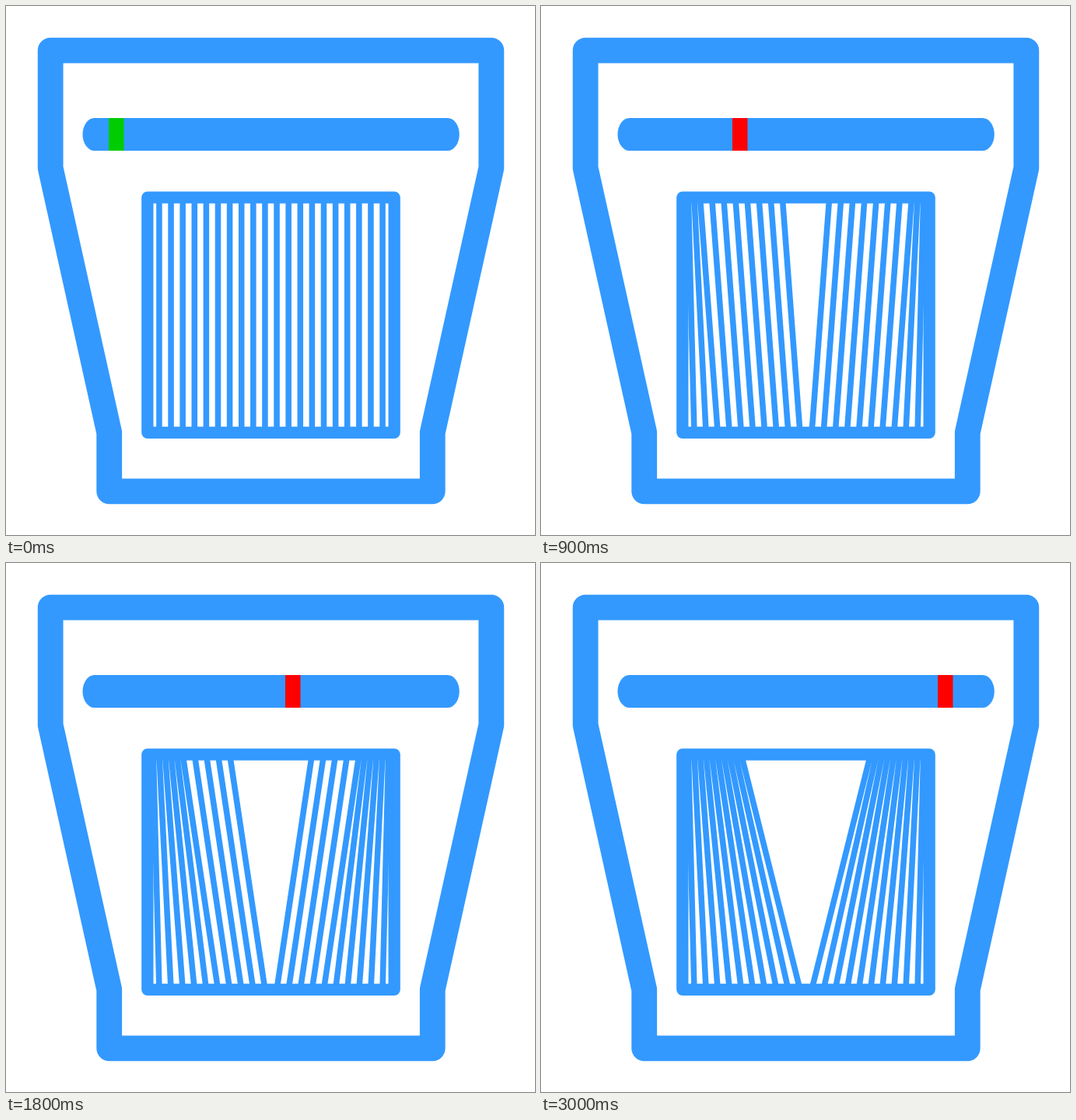
Recreate the animation shown at these times as an HTML page. Size 680 px wide and 680 px high, loop 3.3 s.

```html
<!DOCTYPE html>
<html lang="en">
<head>
<meta charset="utf-8">
<title>Fanning lines</title>
<style>
html, body { margin: 0; width: 100%; height: 100%; overflow: hidden; background: #fff; }
svg { display: block; width: 680px; height: 680px; }
</style>
</head>
<body>
<svg viewBox="0 0 680 680">
  <rect width="680" height="680" fill="#fff"/>
  <g transform="translate(.5 .5) scale(3.77778)" fill="none" stroke="#39f" stroke-linejoin="round">
    <path d="M15 15H165V55L145 145V165H35V145L15 55Z" stroke-width="8.68"/>
    <path id="lines" stroke-width="2"/>
    <rect x="48" y="65" width="84" height="80" stroke-width="4.05"/>
  </g>
  <rect x="98.5" y="144" width="484.3" height="42" rx="15.1" ry="21" fill="#39f"/>
  <rect id="marker" y="144" width="19.5" height="42"/>
</svg>
<script>
const STEP = 300, STEPS = 11, UNIT = 34 / 9;
const lines = document.getElementById('lines');
const marker = document.getElementById('marker');

// Tops slide outwards until they stack against the side of the box.
function fan(step) {
  let d = '';
  for (let i = 1; i <= 10; i++) {
    const foot = 4 * i;
    const top = Math.max(foot - 2 * step, 2 * i);
    d += `M${48 + top} 65L${48 + foot} 145M${132 - top} 65L${132 - foot} 145`;
  }
  return d;
}

function draw(ms) {
  const step = Math.floor(ms / STEP) % STEPS;
  lines.setAttribute('d', fan(step));
  marker.setAttribute('x', Math.round((35 + 10 * step) * UNIT));
  marker.setAttribute('fill', step ? '#f00' : '#0c0');
}

let start = null;
function tick(now) {
  if (start === null) start = now;
  draw(Math.max(0, now - start));
  requestAnimationFrame(tick);
}
draw(0);
requestAnimationFrame(tick);
</script>
</body>
</html>
```
